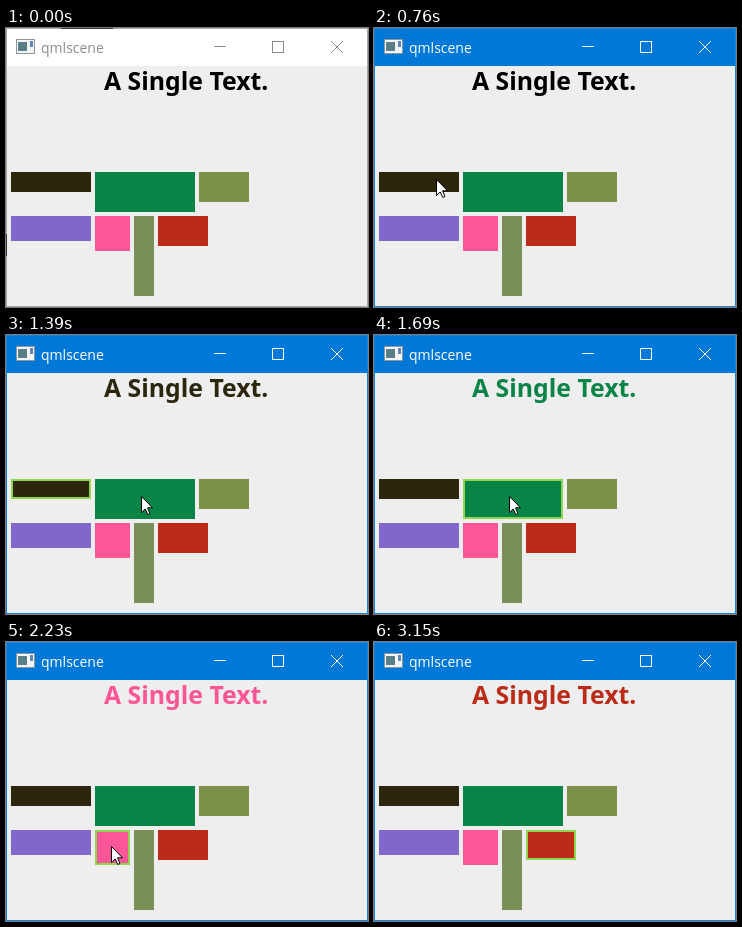
An HTML page for the animation above (3.23 s loop, 362 px wide and 279 px high).

```html
<!DOCTYPE html>
<html lang="en">
<head>
<meta charset="utf-8">
<title>qmlscene</title>
<style>
html, body { margin: 0; height: 100%; overflow: hidden; }
body { --bar: #fff; --edge: #a6a6a6; --ink: #8c8c8c; }
body.active { --bar: #0078d7; --edge: #1583d8; --ink: #fff; }
.active #behind { display: none; }
#window, #cells, #cursor { position: absolute; left: 0; top: 0; }
.crisp { shape-rendering: crispEdges; }
#title { font: 14px "Open Sans", "Noto Sans", sans-serif; fill: var(--ink); }
#label { font: bold 24.8px "Noto Sans", "Open Sans", sans-serif; }
#buttons { fill: none; stroke: var(--ink); }
#cells { left: 5px; top: 144px; width: 300px; display: flex; flex-wrap: wrap; gap: 4px; align-items: flex-start; }
#cells .picked { box-shadow: inset 0 0 0 2px #90d550; }
</style>
</head>
<body>
<svg id="window" width="362" height="279">
  <g class="crisp">
    <rect width="362" height="279" style="fill:var(--edge)"/>
    <path id="behind" d="M55 0h52v1h-52zM0 206h1v22h-1z" fill="#333"/>
    <rect x="1" y="1" width="360" height="37" style="fill:var(--bar)"/>
    <rect x="1" y="38" width="360" height="240" fill="#eee"/>
    <rect x="10" y="11" width="19" height="15" fill="#8b979e"/>
    <rect x="11" y="12" width="17" height="13" fill="#f4f6f7"/>
    <rect x="12" y="14" width="9" height="9" fill="#587f88"/>
    <rect x="24" y="13" width="3" height="6" fill="#5f86b8"/>
  </g>
  <text id="title" x="35" y="25">qmlscene</text>
  <g id="buttons">
    <path class="crisp" d="M208 18.5h12M266.5 13.5h11v11h-11z"/>
    <path d="M325 13l12 12m0-12l-12 12"/>
  </g>
  <text id="label" x="98" y="62">A Single Text.</text>
</svg>
<div id="cells">
  <div style="width:80px; height:20px; background:#2b260c"></div>
  <div style="width:100px; height:40px; background:#088446"></div>
  <div style="width:50px; height:30px; background:#7c9048"></div>
  <div style="width:80px; height:25px; background:#8167c9"></div>
  <div style="width:35px; height:35px; background:#fd5696"></div>
  <div style="width:20px; height:80px; background:#7b9059"></div>
  <div style="width:50px; height:30px; background:#bc2b17"></div>
</div>
<svg id="cursor" width="13" height="20">
  <path d="M.5 .5V16.5L4.2 13L6.8 18.5L8.9 17.5L6.6 11.8H11.5Z" fill="#fff" stroke="#000" stroke-linejoin="round"/>
</svg>
<script>
const LOOP = 3230, FPS = 13;
const ENTER = 2, ACTIVATE = 10, LEAVE = 41;
const FIRST_CLICK = 12, CLICK_GAP = 8;

const $ = id => document.getElementById(id);
const cells = [...$('cells').children];
const clicked = [0, 1, 4, 6].map(i => cells[i]);

// Pointer moves: start tick, end tick, destination
const origin = [149, 248];
const moves = [
  [2, 8, 62, 151],
  [11, 16.5, 135, 161],
  [22, 27.4, 105, 204],
  [31, 34, 172, 197],
  [37, 39, 215, 241],
  [39, 40, 219, 262]
];

const easeOut = u => 1 - (1 - u) ** 2;
const clamp = u => Math.min(1, Math.max(0, u));

function pointerAt(tick) {
  let [x, y] = origin;
  for (const [from, to, toX, toY] of moves) {
    const u = easeOut(clamp((tick - from) / (to - from)));
    x += (toX - x) * u;
    y += (toY - y) * u;
  }
  return [Math.round(x), Math.round(y)];
}

function draw(ms) {
  const tick = Math.floor(ms % LOOP * FPS / 1000 + 0.2);
  document.body.classList.toggle('active', tick >= ACTIVATE);

  const count = Math.floor((tick - FIRST_CLICK) / CLICK_GAP);
  const picked = clicked[Math.min(count, clicked.length - 1)];
  for (const cell of cells) cell.classList.toggle('picked', cell === picked);
  $('label').style.fill = picked ? picked.style.backgroundColor : '#000';

  const [x, y] = pointerAt(tick);
  $('cursor').style.transform = `translate(${x}px, ${y}px)`;
  $('cursor').style.visibility = tick >= ENTER && tick < LEAVE ? 'visible' : 'hidden';
}

const start = performance.now();
function loop() {
  draw(performance.now() - start);
  requestAnimationFrame(loop);
}
loop();
</script>
</body>
</html>
```
